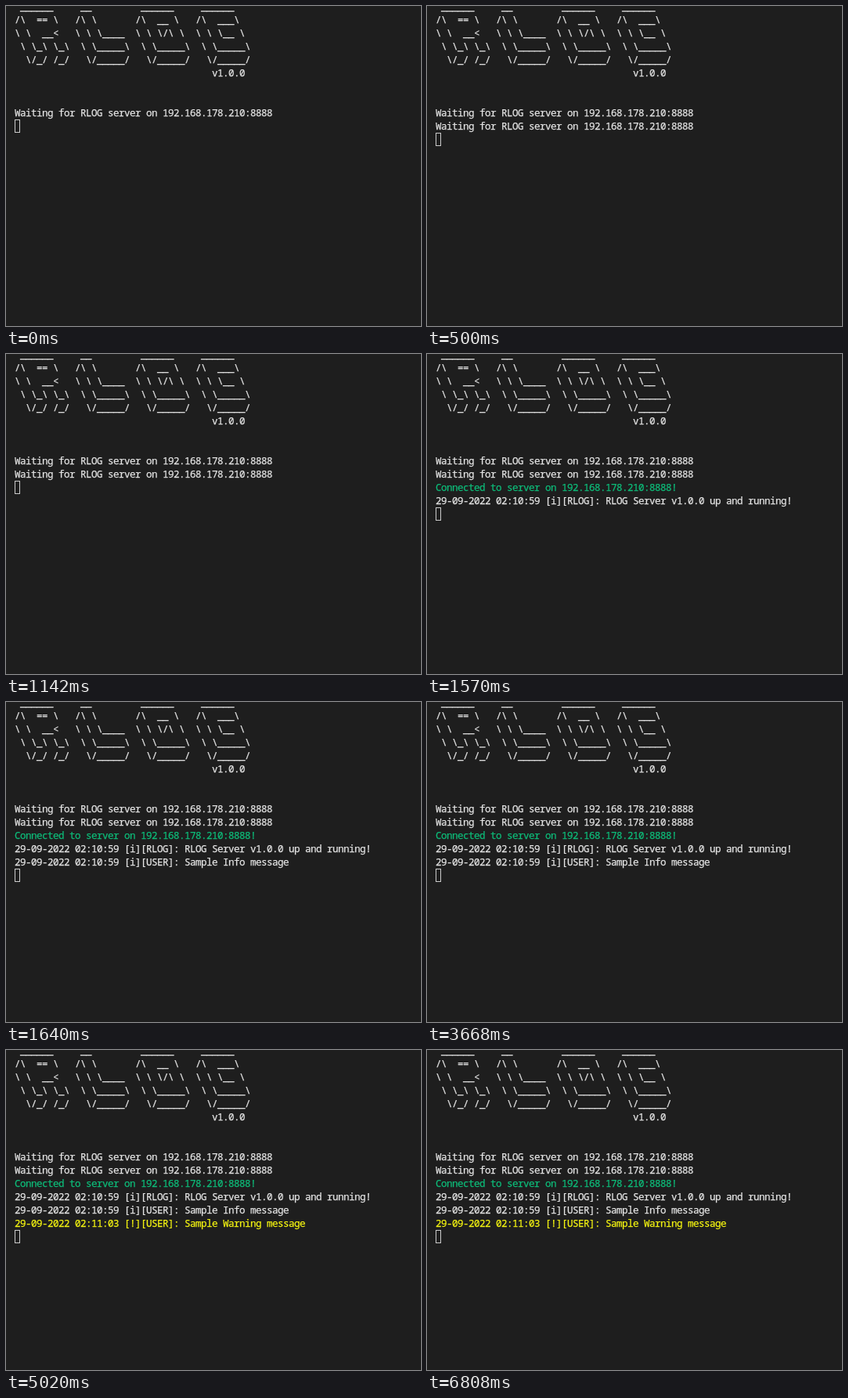
These frames come from a looping animation (530 px wide and 409 px high, 8 s). An HTML page:

```html
<!DOCTYPE html>
<html lang="en">
<head>
<meta charset="utf-8">
<title>RLOG terminal</title>
<style>
  html, body { margin: 0; width: 100%; height: 100%; overflow: hidden; background: #1e1e1e; }
  svg { display: block; width: 530px; height: 409px; }
  text {
    font: 12.5px "Noto Sans Mono", "DejaVu Sans Mono", monospace;
    letter-spacing: -0.5px;
    white-space: pre;
    font-variant-ligatures: none;
    fill: currentColor;
    stroke: currentColor;
    stroke-width: 0.25px;
  }
</style>
</head>
<body>
<svg id="stage" viewBox="0 0 530 409">
  <rect width="530" height="409" fill="#1e1e1e"/>
  <g id="lines"></g>
  <rect id="cursor" x="11.5" width="6" height="16" fill="none" stroke="#cccccc"/>
</svg>
<script>
const LOOP = 8000, LEFT = 11, TOP = -8, CELL = 7, ROW = 17, BASE = 13;
const WHITE = "#e5e5e5", GREEN = "#0dbc79", YELLOW = "#f5f510";

const banner = String.raw`
 ______     __         ______     ______
/\  == \   /\ \       /\  __ \   /\  ___\
\ \  __<   \ \ \____  \ \ \/\ \  \ \ \__ \
 \ \_\ \_\  \ \_____\  \ \_____\  \ \_____\
  \/_/ /_/   \/_____/   \/_____/   \/_____/`.split("\n").slice(1);

const waiting = "Waiting for RLOG server on 192.168.178.210:8888";

// Each log line: time it is printed, text, colour
const log = [
  [0, waiting, WHITE],
  [500, waiting, WHITE],
  [1570, "Connected to server on 192.168.178.210:8888!", GREEN],
  [1570, "29-09-2022 02:10:59 [i][RLOG]: RLOG Server v1.0.0 up and running!", WHITE],
  [1640, "29-09-2022 02:10:59 [i][USER]: Sample Info message", WHITE],
  [5020, "29-09-2022 02:11:03 [!][USER]: Sample Warning message", YELLOW]
];

const header = [...banner, " ".repeat(36) + "v1.0.0", "", ""];
const rows = [...header.map(text => [0, text, WHITE]), ...log];

const group = document.getElementById("lines");
const cursor = document.getElementById("cursor");

const nodes = rows.map(([, text, color], i) => {
  const body = text.trimStart();
  const node = document.createElementNS("http://www.w3.org/2000/svg", "text");
  node.setAttribute("x", LEFT + (text.length - body.length) * CELL);
  node.setAttribute("y", TOP + i * ROW + BASE);
  node.setAttribute("color", color);
  node.textContent = body;
  group.append(node);
  return node;
});

function draw(t) {
  let shown = 0;
  rows.forEach(([at], i) => {
    const on = t >= at;
    nodes[i].setAttribute("visibility", on ? "visible" : "hidden");
    if (on) shown++;
  });
  cursor.setAttribute("y", TOP + shown * ROW + 0.5);
}

const start = performance.now();
function tick() {
  draw((performance.now() - start) % LOOP);
  requestAnimationFrame(tick);
}
draw(0);
requestAnimationFrame(tick);
</script>
</body>
</html>
```
